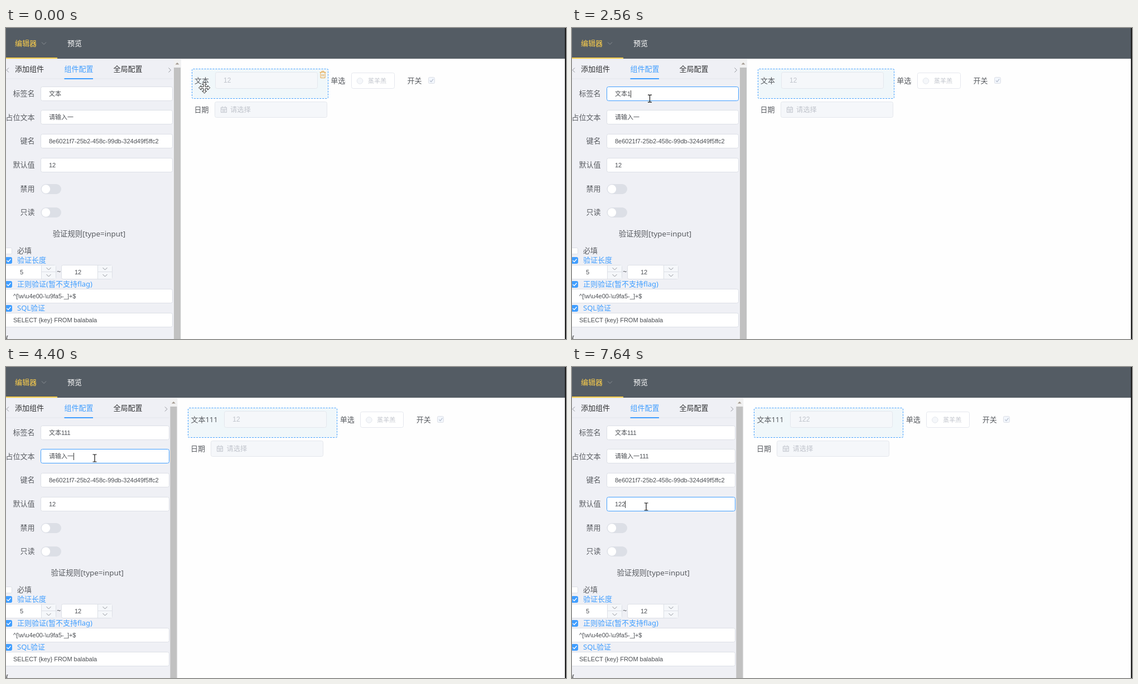
These frames come from a looping animation (1004 by 558 pixels, 8 s). An HTML page:

```html
<!DOCTYPE html>
<html lang="zh">
<head>
<meta charset="utf-8">
<title>Form editor</title>
<style>
  html, body { margin: 0; width: 100%; height: 100%; overflow: hidden; background: #fefefe; }
  svg { display: block; width: 1004px; height: 558px; }
  text { font-family: "Noto Sans", "Noto Sans CJK SC", "Noto Sans CJK", sans-serif; white-space: pre; }
  text.in { font-family: "Liberation Sans", "Noto Sans CJK SC", "Noto Sans CJK", sans-serif; }
</style>
</head>
<body>
<svg id="stage" viewBox="0 0 1004 558"></svg>
<script>
const LOOP = 8000, BLINK = 530;
const BLUE = '#409eff', INK = '#585b60', DARK = '#4b4e53', PALE = '#c0c4cc', LINE = '#dcdfe6', SOFT = '#e4e7ed';

// time, x, y of the pointer
const PATH = [
  [0, 356, 107], [300, 272, 152], [600, 188, 222], [850, 148, 256],
  [1000, 139, 222], [1240, 132, 153], [1500, 134, 126], [1700, 135, 124.5],
  [1930, 135.5, 124.5], [2080, 136.5, 124.5], [2160, 137, 124.5], [2480, 137, 124.5],
  [2560, 139.5, 126.5], [2900, 142, 145], [3240, 148.5, 173], [3540, 148.5, 173],
  [3900, 155, 167], [4320, 159, 163.5], [5010, 159, 163.5], [5400, 166, 235],
  [5710, 141, 268], [5780, 139, 260], [6050, 135, 252], [6320, 134, 253.5],
  [7410, 134, 253.5], [7640, 133, 250.5]
];

// time, changes
const EVENTS = [
  [0, { label: '文本', hint: '请输入一', value: '12', focus: -1, ones: 0, shown: '12' }],
  [1630, { focus: 0 }],
  [2560, { label: '文本1' }], [2640, { ones: 1 }],
  [3010, { label: '文本11' }], [3090, { ones: 2 }],
  [3540, { label: '文本111' }], [3620, { ones: 3 }],
  [4250, { focus: 1 }],
  [4480, { hint: '请输入一1' }], [4630, { hint: '请输入一11' }], [4860, { hint: '请输入一111' }],
  [6180, { focus: 3 }],
  [7410, { value: '122' }], [7490, { shown: '122' }]
];

const FIELD_Y = [105.5, 147.5, 190.5, 233.5];
const stage = document.getElementById('stage');
const pen = document.createElement('canvas').getContext('2d');
pen.font = '11px "Liberation Sans", "Noto Sans CJK SC", "Noto Sans CJK", sans-serif';

const rect = (x, y, w, h, fill, line = 'none', r = 0, more = '') =>
  `<rect x="${x}" y="${y}" width="${w}" height="${h}" rx="${r}" fill="${fill}" stroke="${line}" ${more}/>`;
const path = (d, line, w = 1, fill = 'none', more = '') =>
  `<path d="${d}" stroke="${line}" stroke-width="${w}" fill="${fill}" ${more}/>`;
// y is the middle of the line; the baseline sits on a whole pixel
const text = (s, x, y, size = 13, fill = INK, cls = '', anchor = 'start') =>
  `<text x="${x}" y="${Math.round(y + size * 0.37)}" font-size="${size}" fill="${fill}" class="${cls}" text-anchor="${anchor}">${s}</text>`;
const chevron = (x, y, dx, dy, color) => dx
  ? path(`M${x - dx} ${y - 4}L${x + dx} ${y}L${x - dx} ${y + 4}`, color)
  : path(`M${x - 4} ${y - dy}L${x} ${y + dy}L${x + 4} ${y - dy}`, color);

function pointerAt(t) {
  const i = PATH.findIndex(p => p[0] > t);
  if (i < 0) return PATH[PATH.length - 1].slice(1);
  const [t0, x0, y0] = PATH[i - 1], [t1, x1, y1] = PATH[i];
  const u = (t - t0) / (t1 - t0);
  return [x0 + (x1 - x0) * u, y0 + (y1 - y0) * u];
}

function stateAt(t) {
  const s = {};
  for (const [at, change] of EVENTS) {
    if (at > t) break;
    Object.assign(s, change);
    if (!('ones' in change || 'shown' in change)) s.typed = at;
  }
  s.caret = Math.floor((t - s.typed) / BLINK) % 2 === 0;
  return s;
}

function header() {
  return rect(0, 0, 1004, 55, '#545c64') + rect(0, 55, 1004, 1, '#e6e6e6') +
    text('编辑器', 16, 27.5, 13, '#ffd04b') + chevron(68, 27.5, 0, 2, '#8b9096') +
    rect(0, 53, 92, 2, '#ffd04b') + text('预览', 110, 27.5, 13, '#fff');
}

function numberBox(x, w, value, mid) {
  const r = x + w, c = r - 13;
  return rect(x, 425.5, w, 25, '#fff', LINE, 3) +
    rect(r - 26, 426, 25.5, 24, '#f5f7fa') +
    path(`M${r - 26} 426V450M${r - 26} 437.5H${r}`, LINE) +
    chevron(c, 432, 0, 2, '#909399') + chevron(c, 444, 0, 2, '#909399') +
    text(value, mid, 437.5, 11, DARK, 'in', 'middle');
}

function checkRow(label, y, on) {
  return rect(-1.5, y - 5, 12, 11, on ? BLUE : '#fff', on ? BLUE : LINE, 2) +
    (on ? path(`M1.5 ${y + 0.5}l2.5 2.5l4.5 -5`, '#fff', 1.3) : '') +
    text(label, 20, y, 13, on ? BLUE : INK);
}

function panel(s, px, py) {
  const d = -2.2 * s.ones, right = 298.5 - 2 * s.ones;
  const values = [s.label, s.hint, '8e6021f7-25b2-458c-99db-324d49f5ffc2', s.value];
  let out = rect(0, 56, 314 + d, 502, '#eff0f5') +
    rect(301 + d, 56, 12.5, 502, '#f1f1f1') + rect(301 + d, 71, 12, 487, '#c1c1c1') +
    path(`M${303.5 + d} 65.5h7l-3.5 -3.5z`, 'none', 0, '#a39a90') +
    rect(0, 90.5, 299 + d, 1, SOFT) +
    text('添加组件', 16, 73.5, 13, '#303133') + text('组件配置', 104.5, 73.5, 13, BLUE) +
    text('全局配置', 192.5, 73.5, 13, '#303133') + rect(104.5, 90, 51.5, 2, BLUE) +
    chevron(3, 75.5, -2, 0, '#909399') + chevron(293.5 + d, 75.5, 2, 0, '#909399');

  ['标签名', '占位文本', '键名', '默认值', '禁用', '只读'].forEach((label, i) => {
    out += text(label, 51.5, [117.5, 160, 202.5, 245.5, 288.5, 330.5][i], 13, INK, '', 'end');
  });

  FIELD_Y.forEach((y, i) => {
    const hover = px > 62 && px < right && py > y && py < y + 25.5;
    const line = s.focus === i ? BLUE : hover ? PALE : LINE;
    out += rect(62.5, y, right - 62.5, 25, '#fff', line, 3) + text(values[i], 77, y + 12.7, 11, DARK, 'in');
    if (s.focus === i && s.caret) {
      out += rect(Math.round(77 + pen.measureText(values[i]).width), y + 6.5, 1, 13, '#333');
    }
  });

  for (const y of [289, 331]) {
    out += rect(62.5, y - 9, 36.5, 18, LINE, 'none', 9) + `<circle cx="71.5" cy="${y}" r="7.7" fill="#fff"/>`;
  }
  const wide = (y, s) => rect(-10, y, right + 10, 25, '#fff', LINE, 3) + text(s, 13, y + 12.5, 11, DARK, 'in');
  return out + text('验证规则[type=input]', 83.7 + d / 2, 369, 13.4) +
    checkRow('必填', 399.5, false) + checkRow('验证长度', 416.5, true) +
    numberBox(-10.5, 100, '5', 28) + text('~', 91, 437, 13) + numberBox(99.5, 91, '12', 129) +
    checkRow('正则验证(暂不支持flag)', 459.5, true) + wide(468.5, String.raw`^[\w\u4e00-\u9fa5-_]+$`) +
    checkRow('SQL验证', 502.5, true) + wide(511.5, 'SELECT {key} FROM balabala') +
    text('{', 0, 555.5, 11, '#111', 'in');
}

function trash() {
  return path('M562.5 79.5H573.5M566 79.5V77.5H570V79.5M564 80V89.5H572V80M566.7 82.5V87M569.3 82.5V87', '#e6a23c');
}

function form(s, over) {
  const l = -2.2 * s.ones, r = 5.45 * s.ones;
  const box = Math.round(l), move = Math.round(r);
  return rect(333.5 + box, 73.5, 244 + move - box, 53, '#f0f7fa', BLUE, 2, 'stroke-dasharray="3 2"') +
    text('文本' + '1'.repeat(s.ones), 338 + l, 94) +
    rect(375.5 + move, 79.5, 183, 29, '#f5f7fa', SOFT, 3) + text(s.shown, 390 + r, 94, 12, PALE, 'in') +
    (over ? trash() : '') +
    text('单选', 582.3 + r, 94) + rect(619.5 + move, 80.5, 77, 28, '#fff', SOFT, 3) +
    `<circle cx="${634.5 + r}" cy="95" r="5.3" fill="#f5f7fa" stroke="${SOFT}"/>` +
    text('蒸羊羔', 649 + r, 95, 11, PALE) +
    text('开关', 719.5 + r, 94) + rect(757.5 + move, 88.5, 11, 11, '#f2f6fc', LINE, 2) +
    path(`M${760 + r} 94.3l2.2 2.2l4 -5`, '#b4bccc', 1.2) +
    text('日期', 337.5 + l, 146) + rect(374.5 + box, 132.5, 201, 28, '#f5f7fa', SOFT, 3) +
    path(`M${385.5 + box} 142.5h10v9h-10zM${385.5 + box} 145.5h10M${388 + box} 140.5v3M${393 + box} 140.5v3M${387.5 + box} 147.5h6M${387.5 + box} 149.5h6`, PALE) +
    text('请选择', 402 + l, 146.5, 12.3, PALE);
}

function pointer(x, y, kind) {
  const at = `transform="translate(${x.toFixed(1)} ${y.toFixed(1)})"`;
  if (kind === 'beam') return path('M-3.5 -6.5H-1Q0 -6.5 0 -5.5Q0 -6.5 1 -6.5H3.5M0 -5.5V5.5M-3.5 6.5H-1Q0 6.5 0 5.5Q0 6.5 1 6.5H3.5', '#111', 1.2, 'none', at);
  if (kind === 'move') {
    const arm = 'M-1.5 -1.5V-6H-4L0 -10L4 -6H1.5V-1.5';
    const arms = [0, 90, 180, 270].map(a => path(arm, '#222', 1, '#fff', `transform="rotate(${a})"`)).join('');
    return `<g ${at}>${arms}${rect(-1.5, -1.5, 3, 3, '#fff')}</g>`;
  }
  return path('M0.5 0.5V15.2L3.9 12L6.3 17.3L8.6 16.3L6.2 11.2H10.5Z', '#111', 1, '#fff', at);
}

let last = '';
function draw(t) {
  const s = stateAt(t), [x, y] = pointerAt(t);
  const over = x > 333 && x < 578 && y > 73 && y < 127;
  const inField = x > 62 && x < 299 && FIELD_Y.some(f => y > f && y < f + 26);
  const kind = over ? 'move' : inField ? 'beam' : 'arrow';
  const art = rect(0, 0, 1004, 558, '#fefefe') + header() + panel(s, x, y) + form(s, over) +
    rect(1002, 0, 2, 558, '#1c1c1c') + pointer(x, y, kind);
  if (art !== last) stage.innerHTML = last = art;
}

const start = performance.now();
function tick() {
  draw((performance.now() - start) % LOOP);
  requestAnimationFrame(tick);
}
tick();
</script>
</body>
</html>
```
